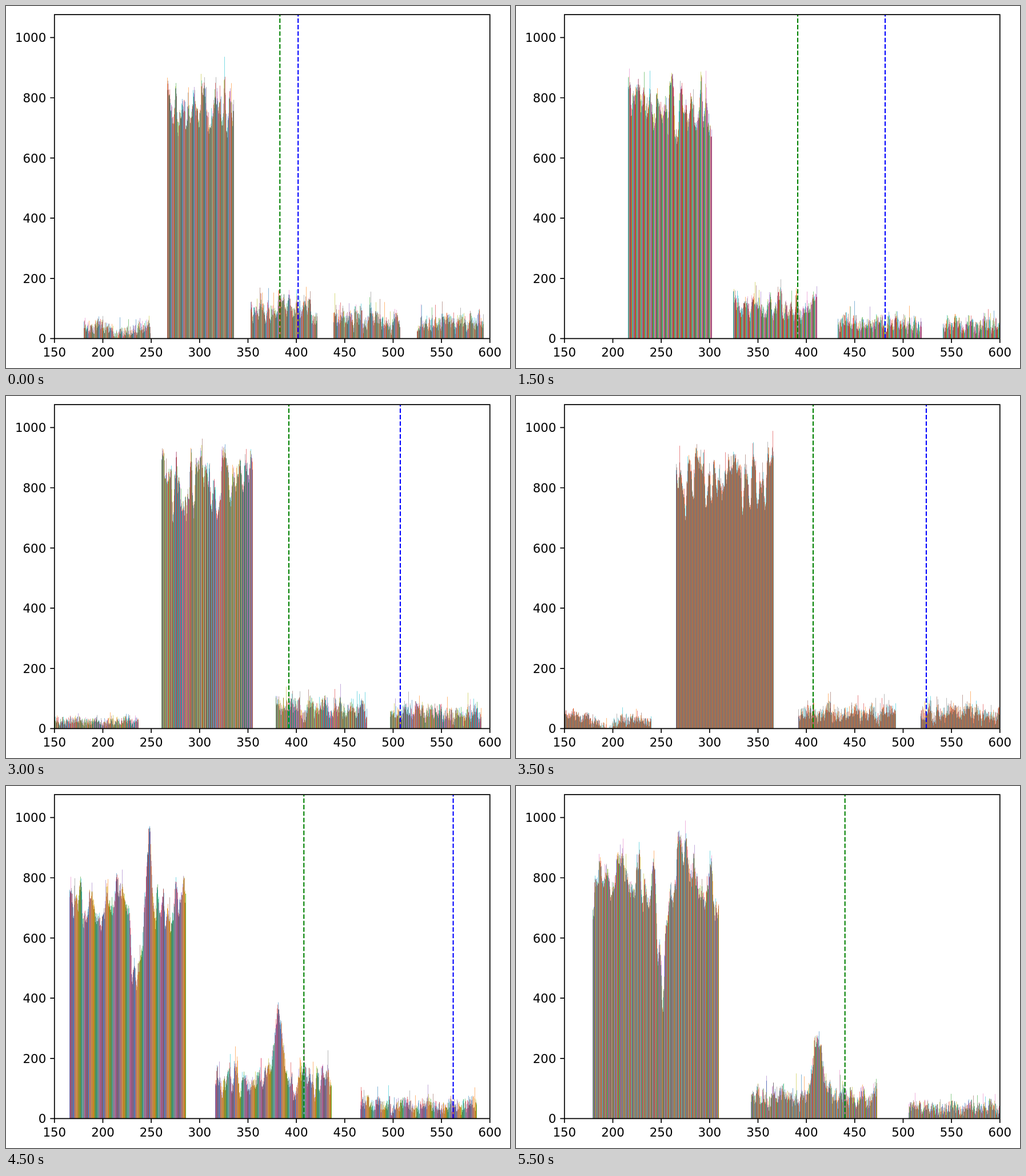
These frames come from a looping animation (882 px wide and 635 px high, 8 s). An HTML page with a canvas:

```html
<!DOCTYPE html>
<html lang="en">
<head>
<meta charset="utf-8">
<title>Histogram steps</title>
<style>
  html, body { margin: 0; width: 100%; height: 100%; overflow: hidden; background: #fff; }
  canvas, svg { position: absolute; left: 0; top: 0; width: 882px; height: 635px; }
  text { font: 21.3px "DejaVu Sans", sans-serif; fill: #000; }
  path { fill: none; stroke: #000; stroke-width: 1.7; }
</style>
</head>
<body>
<canvas id="bars" width="882" height="635"></canvas>
<svg id="axes" viewBox="0 0 882 635"></svg>
<script>
const LEFT = 84.8, RIGHT = 846.8, TOP = 15.2, BASE = 583.4;
const UNIT = 0.528, SERIES = 2739, STEP = 500, LOOP = 8000, TAIL_LEVEL = 52;
const COLORS = ['#1f77b4', '#ff7f0e', '#2ca02c', '#d62728', '#9467bd',
                '#8c564b', '#e377c2', '#7f7f7f', '#bcbd22', '#17becf'];
const ctx = document.getElementById('bars').getContext('2d');

// levels: mean height of the leading groups; bump: a hill or dip inside one group.
const bump = (group, center, width, amount) => ({ group, center, width, amount });
const scenes = [
  { left: 136.3, pitch: 145.7, green: 479.3, blue: 511.2, levels: [38, 750, 100, 70],
    bumps: [bump(0, 0.52, 0.12, -25)] },
  { left: 159, pitch: 152, green: 473, blue: 535, levels: [220, 620, 80] },
  { left: 164.6, pitch: 159, green: 467, blue: 558.8, levels: [480, 365, 62],
    bumps: [bump(0, 0.07, 0.03, 180), bump(0, 0.56, 0.08, -160), bump(1, 0.53, 0.08, 140)] },
  { left: 196, pitch: 183.5, green: 493, blue: 646, levels: [760, 110] },
  { left: 210.3, pitch: 180.6, green: 514.8, blue: 653.7, levels: [730, 105],
    bumps: [bump(0, 0.07, 0.03, 140), bump(0, 0.54, 0.05, -120), bump(1, 0.53, 0.07, 110)] },
  { left: 221.8, pitch: 186.5, green: 470.7, blue: 638.3, levels: [800, 70],
    bumps: [bump(0, 0.7, 0.04, 140), bump(0, 0.55, 0.04, -100), bump(0, 0.98, 0.03, 150)] },
  { left: 72, pitch: 200, green: 495, blue: 690, levels: [25, 810, 65] },
  { left: 66, pitch: 214, green: 520, blue: 718, levels: [28, 820, 52],
    bumps: [bump(0, 0.15, 0.15, 22), bump(0, 0.55, 0.1, -22), bump(1, 0.99, 0.04, 140)] },
  { left: 92, pitch: 234, green: 520, blue: 750, levels: [760, 140] },
  { left: 111.2, pitch: 254.4, green: 521.3, blue: 782.6, levels: [720, 125, 45],
    bumps: [bump(0, 0.57, 0.04, -330), bump(0, 0.69, 0.03, 240), bump(1, 0.54, 0.06, 230)] },
  { left: 126, pitch: 265, green: 548, blue: 815, levels: [760, 105, 45],
    bumps: [bump(0, 0.55, 0.05, -330), bump(1, 0.54, 0.06, 210)] },
  { left: 134.3, pitch: 276.4, green: 575.7, levels: [780, 75, 38],
    bumps: [bump(0, 0.55, 0.04, -320), bump(0, 0.69, 0.05, 150), bump(1, 0.53, 0.05, 190)] }
];

const rand = n => {
  const s = Math.sin(n * 12.9898) * 43758.5453;
  return s - Math.floor(s);
};

// Smooth noise between -1 and 1.
function wave(x, seed) {
  const i = Math.floor(x), f = (1 - Math.cos((x - i) * Math.PI)) / 2;
  return 2 * (rand(i + seed) * (1 - f) + rand(i + 1 + seed) * f) - 1;
}

function barHeight(group, part, x) {
  const { level, bumps, seed } = group;
  const swing = Math.min(level * 0.5, 120);
  const hills = bumps.reduce((sum, b) =>
    sum + b.amount * Math.exp(-(((part - b.center) / b.width) ** 2)), 0);
  const ripple = swing * (0.8 * wave(x / 4.5, seed) + 0.3 * wave(x / 2, seed + 50));
  const jitter = Math.min(level, 45) * (rand(x * 2 + seed + 0.37) - 0.5);
  const spike = rand(x * 3 + seed + 0.71) > 0.95 ? Math.min(level * 0.8, 50) : 0;
  return Math.max(2, level + hills + ripple + jitter + spike) * UNIT;
}

function column(x, top, bottom, color, alpha) {
  ctx.globalAlpha = alpha;
  ctx.fillStyle = color;
  ctx.fillRect(x, BASE - top, 1, top - bottom);
}

// Two thin bars share each pixel column.
function drawGroup(group, start, width) {
  const first = Math.round(start), last = Math.min(first + Math.round(width), RIGHT);
  const bar = x => {
    const part = (x - first) / width;
    return {
      height: barHeight(group, part, x),
      color: COLORS[Math.floor(part * SERIES) % COLORS.length]
    };
  };
  for (let x = Math.max(first, Math.floor(LEFT)); x < last; x++) {
    const [low, high] = [bar(x), bar(x + 0.5)].sort((a, b) => a.height - b.height);
    column(x, low.height, 0, low.color, 1);
    column(x, low.height, 0, high.color, 0.5);
    column(x, high.height, low.height, high.color, 0.55);
  }
}

function dashed(x, color) {
  if (!x) return;
  ctx.strokeStyle = color;
  ctx.beginPath();
  ctx.moveTo(x, BASE);
  ctx.lineTo(x, TOP);
  ctx.stroke();
}

function draw(index) {
  const { left, pitch, green, blue, levels, bumps = [] } = scenes[index];
  ctx.clearRect(0, 0, 882, 635);
  for (let i = 0; left + i * pitch < RIGHT; i++) {
    const group = {
      level: levels[i] ?? TAIL_LEVEL,
      bumps: bumps.filter(b => b.group === i),
      seed: index * 917 + i * 131
    };
    drawGroup(group, left + i * pitch, pitch * 0.8);
  }
  ctx.globalAlpha = 1;
  ctx.lineWidth = 2.1;
  ctx.setLineDash([7.9, 3.4]);
  dashed(green, '#008000');
  dashed(blue, '#0000ff');
}

function drawAxes() {
  let path = `M${LEFT} ${TOP}H${RIGHT}V${BASE}H${LEFT}Z`, labels = '';
  for (let i = 0; i < 10; i++) {
    const x = LEFT + i * (RIGHT - LEFT) / 9;
    path += `M${x} ${BASE}v7.5`;
    labels += `<text x="${x}" y="614.8" text-anchor="middle">${150 + 50 * i}</text>`;
  }
  for (let v = 0; v <= 1000; v += 200) {
    const y = BASE - v * UNIT;
    path += `M${LEFT} ${y}h-7.5`;
    labels += `<text x="70.2" y="${y + 8}" text-anchor="end">${v}</text>`;
  }
  document.getElementById('axes').innerHTML = `<path d="${path}"/>${labels}`;
}

let shown = -1;
const begin = performance.now();
function tick() {
  const time = (performance.now() - begin) % LOOP;
  const index = Math.min(Math.floor(time / STEP), scenes.length - 1);
  if (index !== shown) draw(shown = index);
  requestAnimationFrame(tick);
}

drawAxes();
tick();
</script>
</body>
</html>
```
